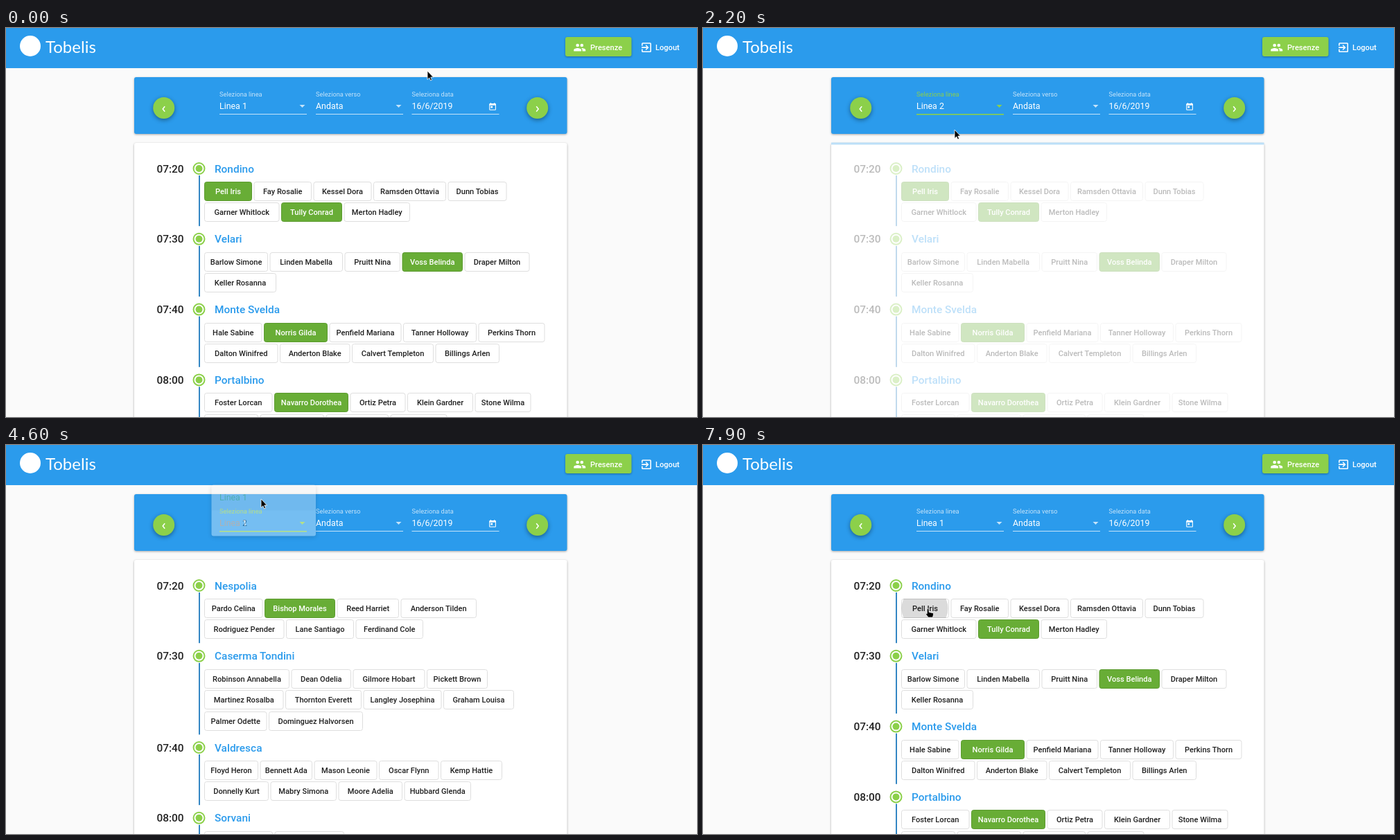
Recreate the animation shown at these times as an HTML page. Size 997 by 562 pixels, loop 8 s.

```html
<!DOCTYPE html>
<html lang="it">
<head>
<meta charset="utf-8">
<title>Presenze</title>
<style>
html, body { margin: 0; width: 100%; height: 100%; overflow: hidden; background: #fafafa; }
svg { display: block; }
text { font-family: Roboto, sans-serif; }
.btn { font-size: 11.1px; font-weight: 500; }
.head { font-size: 15.4px; font-weight: 500; }
.value { font-size: 12.4px; }
.label { font-size: 9.25px; }
.shadow { filter: drop-shadow(0 1px 1.5px #0005); }
.raised { filter: drop-shadow(0 2px 3px #0006); }
.chip rect { fill: #fff; stroke: #dedede; }
.chip text { fill: #212121; text-anchor: middle; }
.chip.on rect { fill: #68ad36; stroke: #5c9b30; }
.chip.on text { fill: #fff; }
</style>
</head>
<body>
<svg id="stage" width="997" height="562" viewBox="0 0 997 562"></svg>
<script>
const BLUE = '#2b9bec', GREEN = '#8cd04a', SOFT = '#ffffffb8';

// Each stop: time, name, rows of chips "name width"; * marks a present child.
const lines = [
  [
    ['07:20', 'Rondino',
      '*Pell Iris 69|Fay Rosalie 83.5|Kessel Dora 84|Ramsden Ottavia 105|Dunn Tobias 85',
      'Garner Whitlock 108.5|*Tully Conrad 88|Merton Hadley 95.5'],
    ['07:30', 'Velari',
      'Barlow Simone 92|Linden Mabella 105.5|Pruitt Nina 80.5|*Voss Belinda 87.5|Draper Milton 94',
      'Keller Rosanna 104'],
    ['07:40', 'Monte Svelda',
      'Hale Sabine 83.5|*Norris Gilda 92|Penfield Mariana 104|Tanner Holloway 106|Perkins Thorn 96',
      'Dalton Winifred 106.5|Anderton Blake 101.5|Calvert Templeton 118|Billings Arlen 92.5'],
    ['08:00', 'Portalbino',
      'Foster Lorcan 98.5|*Navarro Dorothea 107|Ortiz Petra 80|Klein Gardner 95|Stone Wilma 81',
      ' 78| 92.5| 90.5| 82']
  ], [
    ['07:20', 'Nespolia',
      'Pardo Celina 84.5|*Bishop Morales 102|Reed Harriet 89.5|Anderson Tilden 109.5',
      'Rodriguez Pender 115.5|Lane Santiago 98|Ferdinand Cole 97.5'],
    ['07:30', 'Caserma Tondini',
      'Robinson Annabella 123|Dean Odelia 86.5|Gilmore Hobart 104|Pickett Brown 88',
      'Martinez Rosalba 114.5|Thornton Everett 110|Langley Josephina 113|Graham Louisa 102',
      'Palmer Odette 90.5|Dominguez Halvorsen 136'],
    ['07:40', 'Valdresca',
      'Floyd Heron 78|Bennett Ada 75.5|Mason Leonie 91|Oscar Flynn 86.5|Kemp Hattie 89',
      'Donnelly Kurt 93|Mabry Simona 95.5|Moore Adelia 92.5|Hubbard Glenda 96.5'],
    ['08:00', 'Sorvani', ' 99| 100.5']
  ]
];

const text = (x, y, cls, fill, s, extra = '') =>
  `<text x="${x}" y="${y}" class="${cls}" fill="${fill}" ${extra}>${s}</text>`;
const rect = (x, y, w, h, fill, extra = '') =>
  `<rect x="${x}" y="${y}" width="${w}" height="${h}" fill="${fill}" ${extra}/>`;
const circle = (x, y, r, fill, extra = '') =>
  `<circle cx="${x}" cy="${y}" r="${r}" fill="${fill}" ${extra}/>`;
const icon = (x, y, scale, d) =>
  `<path transform="translate(${x} ${y}) scale(${scale})" fill="#fff" d="${d}"/>`;

function chipRow(row, top) {
  let x = 286;
  return row.split('|').map(item => {
    const [, star, name, width] = item.match(/^(\*?)(.*) ([\d.]+)$/);
    const w = +width;
    const out = `<g class="chip ${star && 'on'}">` +
      rect(x + .5, top + .5, w - 1, 27, '', 'rx="3"') +
      text(x + w / 2, top + 18, 'btn', '', name) + '</g>';
    x += w + 2.5;
    return out;
  }).join('');
}

function stops(list) {
  let y = 203;
  return list.map(([time, name, ...rows]) => {
    const height = 41 + 30.4 * rows.length, base = Math.round(y + 5.5);
    const out = text(217.5, base, 'head', '#212121', time) +
      text(301, base, 'head', BLUE, name) +
      rect(278, y + 10, 2, height - 28.6, '#3487c4') +
      circle(278.5, y, 8, '#fff', `stroke="${GREEN}" stroke-width="2"`) +
      circle(278.5, y, 5, GREEN) +
      rows.map((row, i) => chipRow(row, Math.round(y + 19 + 30.4 * i))).join('');
    y += height;
    return out;
  }).join('');
}

const field = (x, label, value, id, arrow) => `<g id="${id}">` +
  text(x, 98.5, 'label', SOFT, label) +
  text(x, 117, 'value', '#fff', value) +
  (arrow ? `<path d="M${x + 115.5} 111h8l-4 4z" fill="${SOFT}"/>` : '') +
  rect(x, 124, 126, 1, SOFT) + '</g>';

const round = (x, dir) => circle(x, 115.5, 15.5, GREEN, 'class="raised"') +
  `<path d="M${x - 1.5 * dir} 113.3l${3 * dir} 3.7l${-3 * dir} 3.7" fill="none" stroke="#fff" stroke-width="1.5"/>`;

const stage = document.getElementById('stage');
stage.innerHTML =
  rect(0, 0, 997, 58, BLUE) +
  circle(35, 26, 15, '#fff') +
  text(57, 36, '', '#fff', 'Tobelis', 'style="font:24px Lato,sans-serif"') +
  rect(807, 13, 95.5, 28, GREEN, 'rx="3" class="shadow"') +
  icon(818.5, 18.9, .77, 'M16 11a3 3 0 1 0 0-6a3 3 0 0 0 0 6zM8 11a3 3 0 1 0 0-6a3 3 0 0 0 0 6zM8 13c-2.3 0-7 1.2-7 3.5V19h14v-2.5C15 14.200 10.300 13 8 13zM16 13l-1 .05c1.200.84 2 2 2 3.450V19h6v-2.500C23 14.200 18.300 13 16 13z') +
  text(843, 32, 'btn', '#fff', 'Presenze') +
  icon(914.8, 18.9, .77, 'M10.1 15.600L11.500 17l5-5l-5-5l-1.400 1.400L12.700 11H3v2h9.700zM19 3H5a2 2 0 0 0-2 2v4h2V5h14v14H5v-4H3v4a2 2 0 0 0 2 2h14a2 2 0 0 0 2-2V5a2 2 0 0 0-2-2z') +
  text(937, 32, 'btn', '#fff', 'Logout') +
  rect(185, 71, 624.5, 82, BLUE, 'rx="3" class="shadow"') +
  round(227.7, -1) + round(766.7, 1) +
  field(308, 'Seleziona linea', 'Linea 1', 'line', true) +
  field(447, 'Seleziona verso', 'Andata', 'way', true) +
  field(585.5, 'Seleziona data', '16/6/2019', 'date', false) +
  icon(695.6, 107.4, .54, 'M19 3h-1V1h-2v2H8V1H6v2H5a2 2 0 0 0-2 2v14a2 2 0 0 0 2 2h14a2 2 0 0 0 2-2V5a2 2 0 0 0-2-2zM19 19H5V8h14zM7 10h5v5H7z') +
  rect(185, 166, 624.5, 420, '#fff', 'rx="3" class="shadow"') +
  lines.map((list, i) => `<g id="list${i}">${stops(list)}</g>`).join('') +
  rect(185, 165.5, 624.5, 3, '#bcdff8', 'id="bar"') +
  `<svg id="wave" y="222" height="28">${circle(0, 14, 0, '#000')}</svg>` +
  '<g id="panel" class="raised">' + rect(296.500, 0, 150.500, 74, '#fff', 'rx="3"') +
  [0, 1].map(i => rect(296.500, 37 * i, 150.500, 37, '#0000000d', 'class="hover"') +
    text(308, 22.500 + 37 * i, 'value', '', 'Linea ' + (i + 1), 'data-option')).join('') + '</g>' +
  '<g id="cursor" stroke="#fff" stroke-width=".8" stroke-linejoin="round">' +
  '<path d="M0 0V12.500L2.800 9.900L4.600 14L6.600 13.100L4.800 9.100H8.500Z"/>' +
  '<path d="M0 0C1 0 1.600.600 1.600 1.600V5l5 1c1 .200 1.400.800 1.400 1.600c0 2-.600 3-1 5H.500L-2.700 8.400c-.500-1 .600-1.800 1.400-1.100V1.600C-1.300.600-1 0 0 0Z"/></g>';

const $ = id => document.getElementById(id);
const set = (el, attrs) => { for (const k in attrs) el.setAttribute(k, attrs[k]); };
const show = (el, on) => { el.style.display = on ? '' : 'none'; };
const within = (t, a, b) => t >= a && t < b;

// Pointer stops: time, x, y
const path = [
  [0, 608, 62], [300, 866, 50], [600, 637, 98], [700, 637, 98], [1100, 390, 115],
  [1400, 390, 115], [1900, 363, 147], [2800, 363, 147], [3000, 368, 128], [3100, 368, 128],
  [3200, 373, 122], [3700, 373, 122], [3800, 375, 115], [3900, 373, 111], [4200, 373, 111],
  [4500, 368, 78], [4700, 368, 78], [5100, 650, 127], [5200, 650, 127], [5600, 300, 258],
  [5800, 380, 234], [5900, 380, 234], [6000, 388, 237], [7200, 388, 237], [7600, 324.5, 236.5],
  [8000, 324.5, 236.5]
];

function pointer(t) {
  const i = path.findIndex(k => k[0] > t);
  const [t0, x0, y0] = path[i - 1], [t1, x1, y1] = path[i];
  const u = (t - t0) / (t1 - t0), e = u * u * (3 - 2 * u);
  return [x0 + (x1 - x0) * e, y0 + (y1 - y0) * e];
}

// Ripples: start, end, chip x, chip width, centre x
const waves = [[6000, 6800, 357.5, 83.5, 388], [6900, 7500, 357.5, 83.5, 388], [7600, 8300, 286, 69, 320]];
const chips = $('list0').querySelectorAll('.chip');
const [label, value] = $('line').querySelectorAll('text');
const arrow = $('line').querySelector('path'), underline = $('line').querySelector('rect');

function draw(t) {
  const focus = within(t, 1500, 6000), second = within(t, 2000, 4600);
  const tint = focus ? GREEN : SOFT;
  for (const el of [label, arrow, underline]) set(el, { fill: tint });
  set(underline, { height: focus ? 1.6 : 1 });
  value.textContent = second ? 'Linea 2' : 'Linea 1';

  const loading = within(t, 2100, 2300) || within(t, 4700, 4900);
  const listB = within(t, 2300, 4900);
  [0, 1].forEach(i => {
    show($('list' + i), listB == i);
    set($('list' + i), { opacity: loading ? .3 : 1 });
  });
  show($('bar'), loading);

  const [x, y] = pointer(t);
  const open = within(t, 1500, 2000) || within(t, 4100, 4600);
  const closing = t === 2000 || t === 4600;
  const top = t < 3000 ? 94.5 : 57.5;
  show($('panel'), open || closing);
  set($('panel'), { transform: `translate(0 ${top})`, opacity: closing ? .35 : t === 1500 ? .7 : 1 });
  $('panel').querySelectorAll('.hover').forEach((el, i) => show(el, Math.floor((y - top) / 37) === i));
  $('panel').querySelectorAll('[data-option]').forEach((el, i) =>
    set(el, { fill: second == i ? GREEN : '#212121' }));

  const coxOn = within(t, 6100, 7000);
  chips[0].classList.toggle('on', t < 7700);
  chips[1].classList.toggle('on', coxOn);
  const wave = waves.find(w => within(t, w[0], w[1]));
  show($('wave'), wave);
  if (wave) {
    const [start, end, left, width, cx] = wave;
    set($('wave'), { x: left, width });
    set($('wave').firstChild, {
      cx: cx - left,
      r: Math.min(1, (t - start + 30) / 330) * (left < 300 ? 33.5 : 55),
      fill: coxOn ? '#fff' : '#000',
      opacity: (coxOn ? .1 : .14) * Math.min(1, (end - t) / 200)
    });
  }

  const onField = within(y, 88, 126) && (within(x, 308, 434) || within(x, 447, 573));
  const onChip = within(y, 222, 250) && within(x, 286, 722);
  const hand = open || onField || onChip;
  const [arrowShape, handShape] = $('cursor').children;
  show(arrowShape, !hand);
  show(handShape, hand);
  set($('cursor'), { transform: `translate(${x} ${y})` });
}

const begin = performance.now();
function tick() {
  draw(Math.floor((performance.now() - begin) % 8000 / 100) * 100);
  requestAnimationFrame(tick);
}
tick();
</script>
</body>
</html>
```
